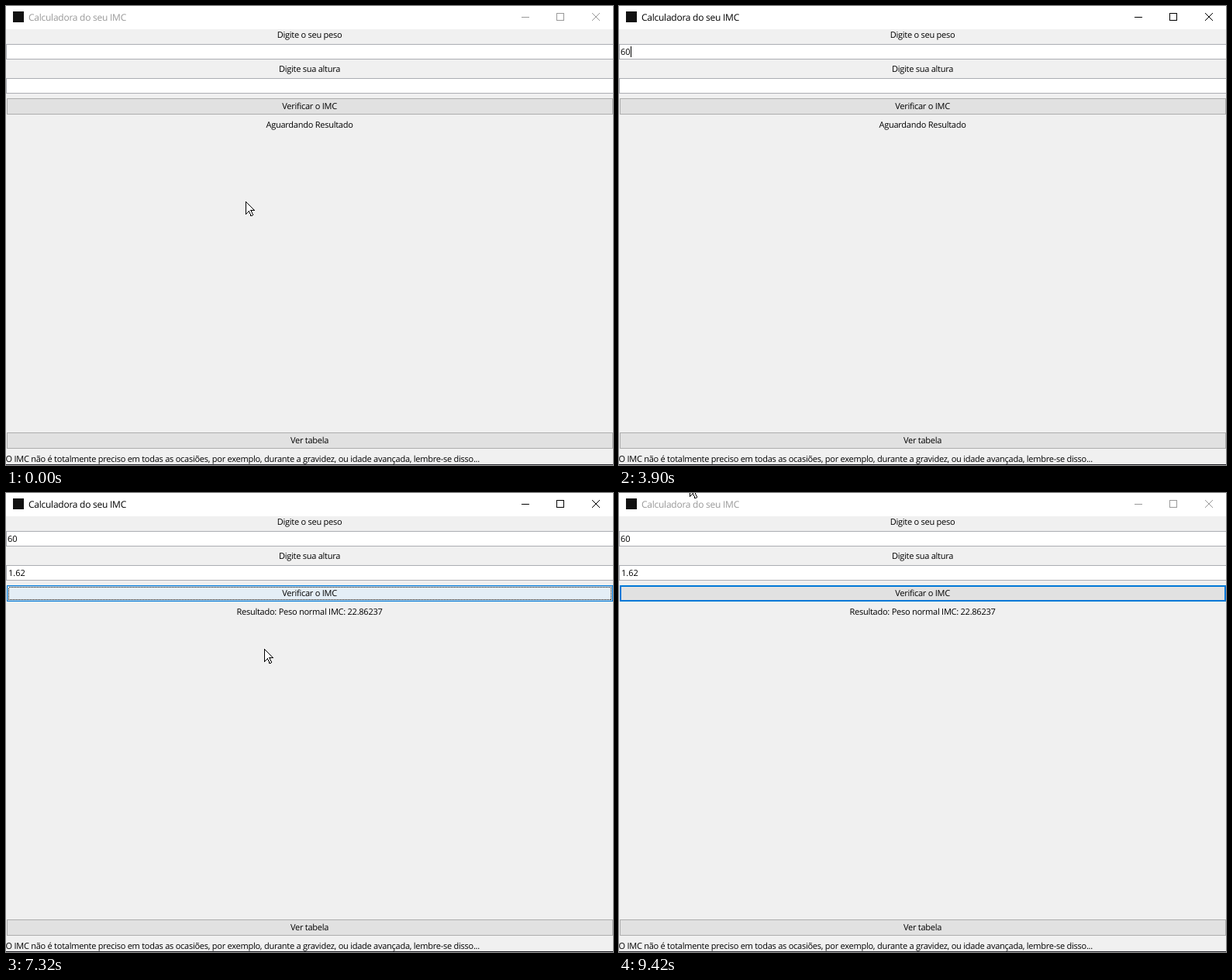
An HTML page for the animation above (9.48 s loop, 783 by 592 pixels).

```html
<!DOCTYPE html>
<html lang="pt">
<head>
<meta charset="utf-8">
<title>Calculadora do seu IMC</title>
<style>
html, body { margin: 0; width: 100%; height: 100%; overflow: hidden; background: #f0f0f0; }
svg { display: block; }
rect, #arrow, #beam { shape-rendering: crispEdges; }
text { font: 11px "Open Sans", "Noto Sans", sans-serif; letter-spacing: -.25px; text-rendering: geometricPrecision; white-space: pre; }
.mid { text-anchor: middle; }
#title { font-size: 12px; }
#weight, #height { letter-spacing: 0; }
.field { fill: #fff; stroke: #abadb3; }
.button { fill: #e1e1e1; stroke: #adadad; }
</style>
</head>
<body>
<svg width="783" height="592" viewBox="0 0 783 592">
  <rect width="783" height="592" fill="#f0f0f0"/>
  <rect width="783" height="30" fill="#fff"/>
  <rect x="9" y="7" width="14" height="14" fill="#111"/>
  <text id="title" x="29" y="19">Calculadora do seu IMC</text>
  <g id="controls" fill="none">
    <path d="M665 14.5h10M756 9l10 10M766 9l-10 10"/>
    <rect x="710.5" y="9.5" width="9" height="9"/>
  </g>

  <text class="mid" x="391.5" y="41">Digite o seu peso</text>
  <rect class="field" x=".5" y="49.5" width="790" height="19"/>
  <text id="weight" x="2" y="63"></text>

  <text class="mid" x="391.5" y="85">Digite sua altura</text>
  <rect class="field" x=".5" y="93.5" width="790" height="19"/>
  <text id="height" x="3" y="107"></text>
  <path id="beam" d="M183.5 101v12" stroke="#e9e9e9"/>
  <rect id="caret" width="1" height="14"/>

  <rect id="check" class="button" x="1.5" y="119.5" width="781" height="20"/>
  <rect id="ring" x="2.5" y="120.5" width="779" height="18" fill="none" stroke="#0078d7"/>
  <rect id="dots" x="3.5" y="121.5" width="777" height="16" fill="none" stroke="#000" stroke-dasharray="1"/>
  <text class="mid" x="391.5" y="133">Verificar o IMC</text>
  <text id="result" class="mid" x="391.5" y="157"></text>

  <rect class="button" x="1.5" y="550.5" width="781" height="20"/>
  <text class="mid" x="391.5" y="564">Ver tabela</text>
  <text x="-.5" y="588">O IMC não é totalmente preciso em todas as ocasiões, por exemplo, durante a gravidez, ou idade avançada, lembre-se disso...</text>
  <rect id="edge" y="591" width="783" height="1"/>
  <path id="arrow" d="M.5.5v16l4-4 2.5 6h1.5l1-1.5-2.5-5.5h4.5z" fill="#fff" stroke="#000"/>
</svg>
<script>
const LOOP = 9480, STEP = 60, BLINK = 420, FADE = 5 * STEP;
const $ = id => document.getElementById(id);
const set = (id, attrs) => { for (const k in attrs) $(id).setAttribute(k, attrs[k]); };
const show = (id, on) => set(id, { visibility: on ? 'visible' : 'hidden' });
const within = (v, a, b) => v >= a && v < b;
const mix = (a, b, p) => `rgb(${a.map((v, i) => Math.round(v + (b[i] - v) * p))})`;

// Turning points of the pointer: time, x, y
const path = [
  [240, 309, 252], [480, 345, 252], [1080, 340, 232], [1380, 314, 57], [3120, 314, 57],
  [3180, 290, 0], [3240, 240, 138], [3420, 218, 146], [3660, 183, 104], [6480, 183, 104],
  [6660, 279, 170], [7020, 318, 130], [7260, 318, 134], [7320, 333, 201], [7440, 345, 252],
  [8160, 622, 242], [8340, 615, 212], [9240, 91, -12]
];

// Clicks into a field and keys typed there
const edits = [
  [1680, 'weight', ''], [2580, 'weight', '6'], [2700, 'weight', '60'],
  [4080, 'height', ''], [5280, 'height', '1'], [5700, 'height', '1.'],
  [6060, 'height', '1.6'], [6180, 'height', '1.62']
];
const CLICK = 7080;

function pointer(t) {
  const i = path.findIndex(k => k[0] > t);
  if (i < 1) return path.at(i).slice(1);
  const [t0, x0, y0] = path[i - 1], [t1, x1, y1] = path[i], p = (t - t0) / (t1 - t0);
  return [x0 + (x1 - x0) * p, y0 + (y1 - y0) * p].map(Math.round);
}

// The highlight is full while the pointer is on the button, then fades.
function highlight(t) {
  for (let ago = 0; ago < FADE; ago += STEP)
    if (within(pointer(t - ago)[1], 119, 140)) return 1 - ago / FADE;
  return 0;
}

function drawFields(t) {
  const past = edits.filter(e => e[0] <= t);
  for (const id of ['weight', 'height'])
    $(id).textContent = past.findLast(e => e[1] === id)?.[2] ?? '';

  const last = past.at(-1);
  show('caret', last && t < CLICK && (t - last[0]) % (2 * BLINK) < BLINK);
  if (last) {
    const [, id, word] = last;
    set('caret', {
      x: 3 + 6 * word.length - (word.includes('.') ? 2 : 0),
      y: id === 'weight' ? 52 : 96
    });
  }
}

function drawButton(t, active) {
  const done = t >= CLICK, glow = highlight(t);
  const fill = mix([225, 225, 225], [229, 241, 251], glow);
  const stroke = mix([173, 173, 173], [0, 120, 215], done ? 1 : glow);
  set('check', { style: `fill:${fill};stroke:${stroke}` });
  set('ring', { opacity: 1 - glow });
  show('ring', done);
  show('dots', done && active);
  $('result').textContent = done ? 'Resultado: Peso normal IMC: 22.86237' : 'Aguardando Resultado';
}

function draw(t) {
  const active = within(t, 1680, 9360), ink = active ? '#000' : '#999';
  set('title', { fill: ink });
  set('controls', { stroke: ink });
  set('edge', { fill: active ? '#1c1c22' : '#2c2c32' });
  drawFields(t);
  drawButton(t, active);

  // Over a text field the pointer is a text cursor, which hardly shows on white.
  const [x, y] = pointer(t);
  const overField = within(y, 49, 69) || within(y, 93, 113);
  show('arrow', !overField && !within(t, 540, 1080));
  show('beam', within(t, 4500, 6480));
  set('arrow', { transform: `translate(${x} ${y})` });
}

const start = performance.now();
function tick() {
  const t = (performance.now() - start) % LOOP;
  draw(Math.floor(t / STEP) * STEP);
  requestAnimationFrame(tick);
}
tick();
</script>
</body>
</html>
```
